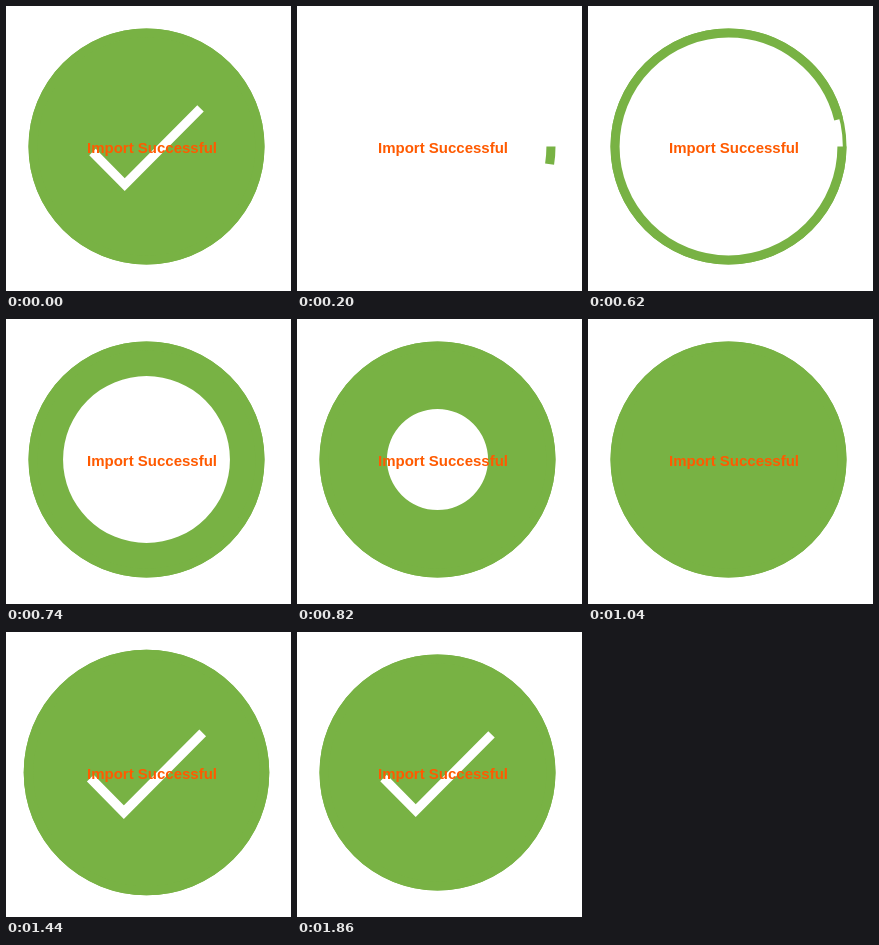
Recreate the animation shown at these times as an HTML page with a canvas. Size 285x285 px, loop 1880 ms.

```html
<!DOCTYPE html>
<html lang="en">
<head>
<meta charset="utf-8">
<title>Import Successful</title>
<style>
  html, body { margin: 0; width: 100%; height: 100%; overflow: hidden; background: #fff; }
  canvas { position: absolute; left: 0; top: 0; }
  p {
    position: absolute; left: 81px; top: 133px; margin: 0;
    font: bold 15px/17px "Liberation Sans", Arial, sans-serif;
    color: #ff5a00; white-space: nowrap;
  }
</style>
</head>
<body>
<canvas id="stage" width="285" height="285"></canvas>
<p>Import Successful</p>
<script>
const ctx = document.getElementById('stage').getContext('2d');
const LOOP = 1880, STEP = 20;
const GREEN = '#78b244';
const CENTER = 140.5, RADIUS = 118;
const UNIT = RADIUS / 26; // the icon is drawn in a 52-unit box

// Symmetric-in-y cubic Bezier easing with control points (x1, 0) and (x2, 1)
function bezier(x1, x2) {
  return x => {
    if (x <= 0) return 0;
    if (x >= 1) return 1;
    let lo = 0, hi = 1;
    for (let i = 0; i < 30; i++) {
      const s = (lo + hi) / 2, r = 1 - s;
      const bx = 3 * r * r * s * x1 + 3 * r * s * s * x2 + s * s * s;
      if (bx < x) lo = s; else hi = s;
    }
    return lo * lo * (3 - 2 * lo);
  };
}
const drawEase = bezier(0.65, 0.45);
const inOut = bezier(0.42, 0.58);
const span = (t, start, length) => Math.min(1, Math.max(0, (t - start) / length));

function ring(p) {
  const sweep = Math.min(Math.PI * 2, p * 166 / 25);
  if (sweep <= 0) return;
  ctx.beginPath();
  ctx.arc(0, 0, 25, 0, sweep);
  ctx.strokeStyle = GREEN;
  ctx.stroke();
}

function fill(p) {
  if (p <= 0) return;
  ctx.beginPath();
  ctx.arc(0, 0, 26, 0, Math.PI * 2);
  if (p < 1) ctx.arc(0, 0, 26 * (1 - p), 0, Math.PI * 2, true);
  ctx.fillStyle = GREEN;
  ctx.fill('evenodd');
}

function check(p) {
  if (p <= 0) return;
  ctx.beginPath();
  ctx.moveTo(-11.9, 1.2);
  ctx.lineTo(-4.8, 8.4);
  ctx.lineTo(11.9, -8.4);
  ctx.setLineDash([48 * p, 100]);
  ctx.strokeStyle = '#fff';
  ctx.stroke();
  ctx.setLineDash([]);
}

function draw(time) {
  let t = Math.floor(time % LOOP / STEP) * STEP;
  if (t < STEP) t = LOOP; // the loop opens on the finished icon

  const pulse = inOut(1 - Math.abs(2 * span(t, 1160, 360) - 1) || 0);
  const scale = UNIT * (1 + 0.1 * pulse);

  ctx.setTransform(1, 0, 0, 1, 0, 0);
  ctx.fillStyle = '#fff';
  ctx.fillRect(0, 0, 285, 285);
  ctx.setTransform(scale, 0, 0, scale, CENTER, CENTER);
  ctx.lineWidth = 2;
  ctx.lineJoin = 'miter';

  fill(inOut(span(t, 560, 480)));
  ring(drawEase(span(t, 90, 696)));
  check(drawEase(span(t, 1035, 360)));
}

let begin;
function tick(now) {
  if (begin === undefined) begin = now;
  draw(now - begin);
  requestAnimationFrame(tick);
}
draw(0);
requestAnimationFrame(tick);
</script>
</body>
</html>
```
